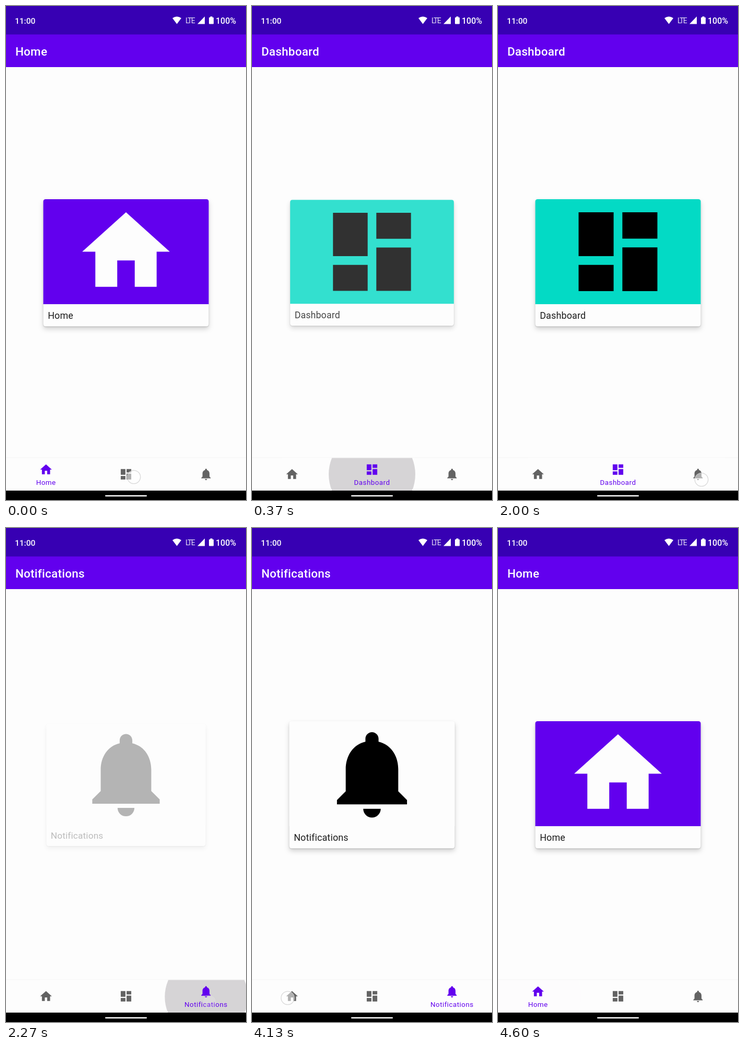
These frames come from a looping animation (460x946 px, 4630 ms). An HTML page:

```html
<!DOCTYPE html>
<html lang="en">
<head>
<meta charset="utf-8">
<title>Bottom navigation</title>
<style>
  html, body { margin: 0; width: 100%; height: 100%; overflow: hidden; background: #fdfdfd; }
  svg { display: block; width: 100%; height: 100%; font-family: Roboto, sans-serif; }
  .title { font-size: 22.4px; font-weight: 500; letter-spacing: .0125em; fill: #fff; }
  .status { font-size: 16px; font-weight: 500; fill: #fff; }
  .network { font-size: 14px; letter-spacing: -1.6px; fill: #e8e4f6; }
  .caption { font-size: 17.9px; letter-spacing: .0094em; fill: #1c1c1c; }
  .label { font-size: 13.43px; letter-spacing: .0333em; text-anchor: middle; fill: #6200ee; }
  .sheet { filter: drop-shadow(0 1px 1px rgba(0,0,0,.18)) drop-shadow(0 5px 5px rgba(0,0,0,.17)); }
</style>
</head>
<body>
<svg id="stage" viewBox="0 0 460 946" preserveAspectRatio="none">
  <defs>
    <clipPath id="navClip"><rect y="865.5" width="460" height="62.5"/></clipPath>
  </defs>
  <rect width="460" height="946" fill="#fdfdfd"/>
  <g id="cards"></g>

  <rect width="460" height="117" fill="#6200ee"/>
  <rect width="460" height="54.5" fill="#3700b3"/>
  <text class="status" x="17" y="33.5" style="font-size:15.5px">11:00</text>
  <text class="network" x="344" y="33">LTE</text>
  <text class="status" x="402" y="33.5">100%</text>
  <path fill="#fff" d="M319 23.3Q327.5 17 336 23.3L327.5 34.5ZM381 20V34.5H367ZM391.5 20h4v1.7h1.5q1 0 1 1V33.5q0 1-1 1h-7q-1 0-1-1V22.7q0-1 1-1h1.5z"/>
  <text class="title" id="title" x="17.9" y="94.5"></text>

  <rect y="864.5" width="460" height="1" fill="#f4f4f4"/>
  <rect y="865.5" width="460" height="62.5" fill="#fdfdfd"/>
  <g clip-path="url(#navClip)"><circle id="ripple" fill="#d6d4d6"/></g>
  <g id="nav"></g>
  <rect y="928" width="460" height="18"/>
  <rect x="190" y="936.7" width="80" height="2.6" rx="1.3" fill="#fff"/>
  <circle id="pointer" r="12.7" fill="#fff" fill-opacity=".5" stroke="#ccc" stroke-opacity=".75" stroke-width="1.3"/>
</svg>
<script>
const LOOP = 4630;
const HOME = 'M10 20v-6h4v6h5v-8h3L12 3 2 12h3v8z';
const TILES = 'M3 13h8V3H3zM3 21h8v-6H3zM13 21h8V11h-8zM13 3v6h8V3z';
const BELL = 'M12 22c1.1 0 2-.9 2-2h-4c0 1.1.89 2 2 2zM18 16v-5c0-3.07-1.64-5.64-4.5-6.32V4' +
  'c0-.83-.67-1.5-1.5-1.5s-1.5.67-1.5 1.5v.68C7.63 5.36 6 7.92 6 11v5l-2 2v1h16v-1z';

const pages = [
  { name: 'Home', icon: HOME, back: '#6200ee', ink: '#fdfdfd' },
  { name: 'Dashboard', icon: TILES, back: '#03dac5', ink: '#000' },
  { name: 'Notifications', icon: BELL, back: '#fdfdfd', ink: '#000' }
];
// shown: finger appears; at: tap begins to take effect
const taps = [
  { shown: 0, at: 100, from: 0, to: 1, x: 245, y: 902 },
  { shown: 2000, at: 2070, from: 1, to: 2, x: 390, y: 907 },
  { shown: 4130, at: 4170, from: 2, to: 0, x: 68.5, y: 900 }
];

const NAV_Y = 896.7, CARD_X = 230, CARD_Y = 491;
const SELECT = 87, FADE_THROUGH = 91, RIPPLE = 55;

const byId = id => document.getElementById(id);
const set = (el, attrs) => {
  for (const key in attrs) el.setAttribute(key, attrs[key]);
  return el;
};
const add = (parent, tag, attrs, text = '') => {
  const el = document.createElementNS('http://www.w3.org/2000/svg', tag);
  el.textContent = text;
  return parent.appendChild(set(el, attrs));
};
const clamp = v => Math.min(1, Math.max(0, v));
const mix = (a, b, p) => a + (b - a) * p;

// cubic-bezier(.4, 0, .2, 1)
function ease(x) {
  x = clamp(x);
  let lo = 0, hi = 1;
  for (let i = 0; i < 20; i++) {
    const u = (lo + hi) / 2, v = 1 - u;
    if (1.2 * v * v * u + 0.6 * v * u * u + u ** 3 < x) lo = u; else hi = u;
  }
  return lo * lo * (3 - 2 * lo);
}

pages.forEach((page, i) => {
  page.card = add(byId('cards'), 'g', {});
  add(page.card, 'rect', { class: 'sheet', x: 71.5, y: 370, width: 317, height: 243.5, rx: 4.5, fill: '#fdfdfd' });
  add(page.card, 'path', { d: 'M71.5 571V374.5q0-4.5 4.5-4.5H384q4.5 0 4.5 4.5V571z', fill: page.back });
  add(page.card, 'path', { d: page.icon, fill: page.ink, transform: 'translate(129.3 369.9) scale(8.39)' });
  add(page.card, 'text', { class: 'caption', x: 80.2, y: 599.3 }, page.name);

  page.x = 460 * (i + 0.5) / 3;
  page.tab = add(byId('nav'), 'path', { d: page.icon });
  page.label = add(byId('nav'), 'text', { class: 'label' }, page.name);
});

function drawCards(tap, s) {
  const p = ease((s - FADE_THROUGH) / 300);
  pages.forEach((page, i) => {
    const alpha = i === tap.from ? clamp(1 - p / 0.35) : i === tap.to ? clamp((p - 0.35) / 0.65) : 0;
    const scale = i === tap.to ? mix(0.92, 1, p) : 1;
    set(page.card, {
      opacity: alpha,
      transform: `translate(${CARD_X} ${CARD_Y}) scale(${scale}) translate(${-CARD_X} ${-CARD_Y})`
    });
  });
}

function drawNav(tap, s) {
  const current = s < SELECT ? tap.from : tap.to;
  const p = ease((s - SELECT) / 115);
  byId('title').textContent = pages[current].name;
  pages.forEach((page, i) => {
    const on = i === tap.to ? p : i === tap.from ? 1 - p : 0;
    set(page.tab, {
      fill: i === current ? '#6200ee' : '#636363',
      transform: `translate(${page.x} ${NAV_Y - 8.9 * on}) scale(1.119) translate(-12 -12)`
    });
    set(page.label, {
      opacity: on,
      transform: `translate(${page.x} 917) scale(${mix(0.5, 1, on)})`
    });
  });
}

function drawTouch(tap, s) {
  const grow = ease((s - RIPPLE) / 225);
  set(byId('ripple'), {
    cx: mix(tap.x, pages[tap.to].x, grow),
    cy: mix(tap.y, NAV_Y, grow),
    r: mix(46, 83, grow),
    opacity: clamp((s - RIPPLE) / 75) * clamp(1 - (s - RIPPLE - 225) / 153)
  });
  set(byId('pointer'), { cx: tap.x, cy: tap.y, opacity: clamp(1 - (s - SELECT) / 150) });
}

function frame(now) {
  const t = now % LOOP;
  const tap = taps.findLast(item => t >= item.shown);
  const s = t - tap.at;
  drawCards(tap, s);
  drawNav(tap, s);
  drawTouch(tap, s);
}

let start;
function tick(now) {
  start ??= now;
  frame(now - start);
  requestAnimationFrame(tick);
}
frame(0);
requestAnimationFrame(tick);
</script>
</body>
</html>
```
